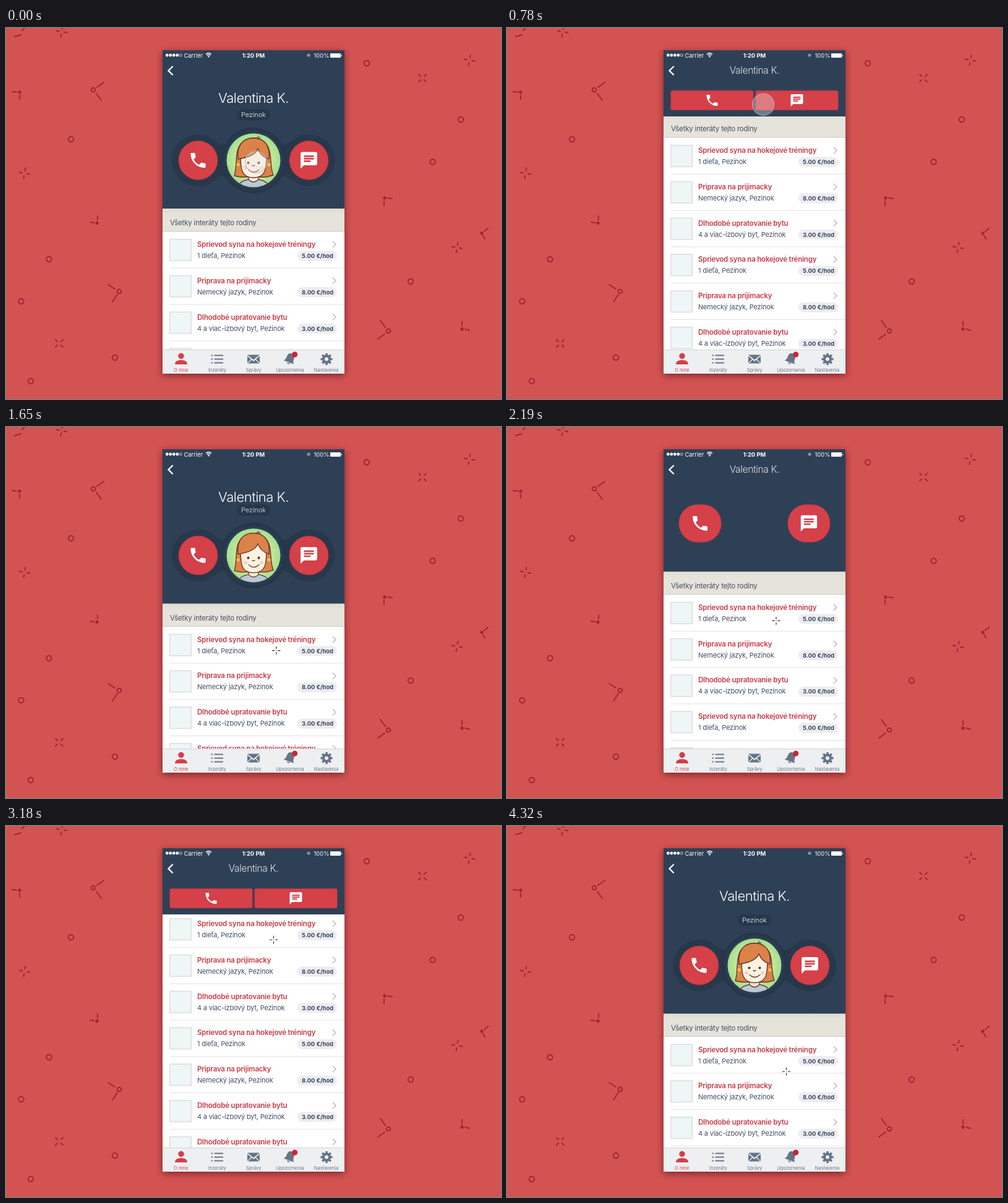
An HTML page that plays this animation: 800 by 600 pixels, repeating every 4350 ms.

```html
<!DOCTYPE html>
<html lang="sk">
<head>
<meta charset="utf-8">
<title>Collapsing profile header</title>
<style>
  html, body { margin: 0; width: 100%; height: 100%; overflow: hidden; background: #d25352; }
  svg { display: block; width: 100vw; height: 100vh; font-family: Inter, "Open Sans", sans-serif; }
  .deco { fill: none; stroke: #a12536; stroke-width: 1.9; stroke-linecap: round; }
  .deco .dot { fill: #a12536; }
  .mid { text-anchor: middle; }
  .status { font-size: 9.4px; fill: #fff; }
  .body { font-size: 11px; letter-spacing: -.2px; fill: #434f66; }
  .title { font-size: 11.5px; letter-spacing: -.2px; font-weight: 600; fill: #c73d49; }
  .price { font-size: 9.4px; font-weight: 700; fill: #3b475c; }
  .tab { font-size: 7.5px; fill: #6a7787; }
  .ink { stroke: #633429; stroke-width: 1.3; stroke-linejoin: round; stroke-linecap: round; }
</style>
</head>
<body>
<svg viewBox="0 0 800 600">
  <defs>
    <clipPath id="screen"><rect x="253" y="36" width="294" height="523"/></clipPath>
    <clipPath id="face"><circle r="43.3"/></clipPath>
    <radialGradient id="lawn"><stop offset=".35" stop-color="#e3f0a0"/><stop offset="1" stop-color="#a4df91"/></radialGradient>
    <linearGradient id="sand" x2="0" y2="1"><stop offset="0" stop-color="#dfdcd2"/><stop offset=".25" stop-color="#e6e4da"/><stop offset="1" stop-color="#e6e4da"/></linearGradient>
  </defs>
  <rect width="800" height="600" fill="#d25352"/>
  <g id="deco" class="deco"></g>
  <rect x="253" y="36" width="294" height="523" fill="#fff" style="filter:drop-shadow(0 3px 6px rgba(70,5,20,.6))"/>

  <g clip-path="url(#screen)">
    <g id="content">
      <rect x="253" width="294" height="37" fill="url(#sand)"/>
      <path d="M253 37h294" stroke="#cfcac5"/>
      <text class="body" x="265" y="27" style="font-size:11.5px">Všetky interáty tejto rodiny</text>
      <g id="rows"></g>
    </g>

    <rect id="header" x="253" y="36" width="294" fill="#2e4056"/>
    <g id="rings" fill="#28384b">
      <path d="M310 -42C335 -42 338 -25 353 -25L447 -25C462 -25 465 -42 490 -42A42 42 0 0 1 490 42C465 42 462 25 447 25L353 25C338 25 335 42 310 42A42 42 0 0 1 310 -42Z"/>
      <circle cx="400" r="52.5" stroke="#223145" stroke-width="1"/>
      <circle cx="400" r="47" fill="#2c3e53"/>
    </g>
    <g id="badge">
      <rect x="373" y="-9" width="54" height="18" rx="9" fill="#27374a"/>
      <text class="mid" x="400" y="4" font-size="10.8" letter-spacing="-.05" fill="#c4cbd3">Pezinok</text>
    </g>

    <g id="avatar">
      <circle r="43.5" fill="url(#lawn)"/>
      <g clip-path="url(#face)" class="ink">
        <path fill="#dc8249" d="M-31 25C-27 12 -29 -4 -26 -15C-20 -43 20 -43 26 -15C29 -4 27 12 32 24L21 27H-21Z"/>
        <path fill="#b9c9d7" d="M-25 46C-24 34 -14 32 -8 31H8C14 32 24 34 25 46Z"/>
        <path fill="#fbe6d2" d="M-8 22V31Q0 39 8 31V22Z"/>
        <path fill="#fdf1e2" d="M-21 -12C-21 14 -20 28 0 28S21 14 21 -12C12 -22 -12 -22 -21 -12Z"/>
        <path fill="#dc8249" d="M-25 -2C-12 -4 4 -8 7 -19C10 -10 16 -5 25 -2C27 -21 20 -36 0 -36S-27 -21 -25 -2Z"/>
        <path fill="none" d="M3 -36Q6 -35 8 -39M7 -35L11 -37M-2 8Q0 10 2 8M-8 15Q0 23 9 15"/>
        <circle cx="-8.500" cy="4" r="1.400" fill="#382522"/><circle cx="8.500" cy="4" r="1.400" fill="#382522"/>
        <g stroke="none">
          <circle cx="-13" cy="12" r="3" fill="#f8d3bd"/><circle cx="13" cy="12" r="3" fill="#f8d3bd"/>
          <circle cx="-25" cy="7" r="2.500" fill="#f4c83f"/><circle cx="25" cy="7" r="2.500" fill="#f4c83f"/>
        </g>
      </g>
    </g>

    <g id="name"><text class="mid" y="7.700" font-size="22" font-weight="300" letter-spacing="-.5" fill="#fff">Valentina K.</text></g>

    <g fill="#fff">
      <rect id="callBox" fill="#d54049" stroke="#b9333f" stroke-width=".7"/>
      <path id="callIcon" d="M6.620 10.790c1.440 2.830 3.760 5.140 6.590 6.590l2.200-2.200c.27-.27.67-.36 1.020-.24 1.120.37 2.330.57 3.570.57.55 0 1 .45 1 1V20c0 .55-.45 1-1 1C10.600 21 3 13.400 3 4c0-.55.45-1 1-1h3.500c.55 0 1 .45 1 1 0 1.250.2 2.450.57 3.570.11.35.03.74-.25 1.020z"/>
      <rect id="chatBox" fill="#d54049" stroke="#b9333f" stroke-width=".7"/>
      <path id="chatIcon" fill-rule="evenodd" d="M20 2H4Q2 2 2 4V22L6 18H20Q22 18 22 16V4Q22 2 20 2ZM6 6H18V8H6ZM6 9H18V11H6ZM6 12H14V14H6Z"/>
    </g>

    <g id="status"></g>
    <path d="M269 62.500L262.500 69L269 75.500" fill="none" stroke="#fff" stroke-width="2.400" stroke-linecap="round"/>

    <rect x="253" y="520" width="294" height="39" fill="#eeeff1"/>
    <path d="M253 520.500h294" stroke="#d2d3d8"/>
    <g id="tabs" fill="#657486">
      <g fill="#d33f49"><circle cx="283" cy="530.500" r="4.700"/><path d="M273 544Q273 537 283 537T293 544Z"/></g>
      <path d="M336.500 529.500H351M336.500 535.500H351M336.500 541.500H351M331.500 529.500h2.500M331.500 535.500h2.500M331.500 541.500h2.500" stroke="#657486" stroke-width="2"/>
      <path d="M390 528.500H410L400 536.500ZM390 530.500L396 535.500L390 542ZM410 530.500L404 535.500L410 542ZM397 536.500L400 539L403 536.500L409 542.500H391Z"/>
      <path transform="rotate(20 459 535)" d="M450 541Q453 539 453 533Q453 526 459 526T465 533Q465 539 468 541ZM456 542h6q-3 4-6 0Z"/>
      <circle cx="466.700" cy="528" r="4.500" fill="#d3222f"/>
      <g id="gear" fill="none" stroke="#657486"><circle cx="518" cy="535.500" r="5" stroke-width="4"/></g>
    </g>
  </g>

  <g id="touch"><circle r="17.500" fill="#e9e9e9" fill-opacity=".35" stroke="#b9b4b4" stroke-opacity=".65" stroke-width="1.500"/></g>
  <g id="cross" fill="none">
    <path d="M-7 0H-2.500M2.500 0H7M0 -7V-2.500M0 2.500V7" stroke="#fff" stroke-width="2.400" stroke-opacity=".7"/>
    <path d="M-6.500 0H-2.500M2.500 0H6.500M0 -6.500V-2.500M0 2.500V6.500M-.5 0H.5" stroke="#252525" stroke-width="1.100"/>
  </g>
</svg>
<script>
const LOOP = 4350;
const $ = id => document.getElementById(id);
const add = (id, markup) => $(id).insertAdjacentHTML('beforeend', markup);
const clamp = v => Math.max(0, Math.min(1, v));
const mix = (a, b, p) => a + (b - a) * p;
const move = (id, x, y, scale = 1) => $(id).setAttribute('transform', `translate(${x} ${y}) scale(${scale})`);
const set = (id, attrs) => { for (const key in attrs) $(id).setAttribute(key, attrs[key]); };

function drawBackdrop() {
  for (const [x, y] of [[105,180],[583,57],[735,148],[689.5,216.5],[69.5,374],[24.5,442],[176,533],[40,571],[654,410]])
    add('deco', `<circle cx="${x}" cy="${y}" r="4.2"/>`);
  for (const [x, y, turn] of [[90,6,10],[30,235,10],[749,52,10],[729,355,10],[673,81,45],[86,510,45]])
    add('deco', `<path transform="translate(${x} ${y}) rotate(${turn})" d="M-8.500 0H-4M4 0H8.500M0 -8.500V-4M0 4V8.500"/>`);
  const clocks = [
    [141, 100, 3.3, 'M147 96L158 88M146 106L154 117'], [183, 426, 3.3, 'M165 415L176 422M180 431L172 443'],
    [618, 490, 3.3, 'M605 473L613 484M612 495L601 503'], [769, 332, 1.7, 'M773 329L779 324M771 336L774 341'],
    [22, 104, 1.7, 'M10 103L17 103.500M22 109V115'], [147, 315.5, 1.7, 'M136 314L142 315M148 304V310'],
    [612, 275, 1.7, 'M617 275L624 276M611 280V287'], [737, 487, 1.7, 'M737 475V482M742 487L749 489']
  ];
  for (const [x, y, r, hands] of clocks)
    add('deco', `<circle cx="${x}" cy="${y}" r="${r}" class="${r < 2 ? 'dot' : ''}"/><path d="${hands}"/>`);
  add('deco', '<path d="M14 14L24 11M26 4L30 0"/>');
}

function drawRows() {
  const jobs = [
    ['Sprievod syna na hokejové tréningy', '1 dieťa, Pezinok', '5.00'],
    ['Priprava na prijimacky', 'Nemecký jazyk, Pezinok', '8.00'],
    ['Dlhodobé upratovanie bytu', '4 a viac-izbový byt, Pezinok', '3.00']
  ];
  [0, 1, 2, 0, 1, 2, 2, 0].forEach((job, i) => {
    const [title, info, price] = jobs[job];
    add('rows', `<g transform="translate(0 ${37 + i * 58.8})">
      <rect x="264.700" y="12.700" width="34.600" height="34.600" fill="#eef6f6" stroke="#dedddc" stroke-width="1.500"/>
      <text class="title" x="309" y="25">${title}</text>
      <text class="body" x="309" y="43">${info}</text>
      <rect x="471" y="31.500" width="64" height="16" rx="8" fill="#ececf1"/>
      <text class="price mid" x="503.500" y="43">${price} €/hod</text>
      <path d="M528 16L533 21L528 26" fill="none" stroke="#bfc0c4" stroke-width="1.600"/>
      <path d="M265 59.300H547" stroke="#e3e2e4"/></g>`);
  });
}

function drawBars() {
  for (let i = 0; i < 5; i++)
    add('status', `<circle cx="${260.3 + i * 5.5}" cy="44" r="${i < 4 ? 2.4 : 2}" fill="${i < 4 ? '#fff' : 'none'}" stroke="#fff" stroke-width="${i < 4 ? 0 : .7}"/>`);
  add('status', `<text class="status" x="287.500" y="47.500">Carrier</text>
    <path d="M323 42.500Q327.500 38.500 332 42.500M324.700 44.500Q327.500 42 330.300 44.500" fill="none" stroke="#fff" stroke-width="1.300"/>
    <circle cx="327.500" cy="46.300" r="1.200" fill="#fff"/>
    <text class="status mid" x="400" y="47.500" font-weight="700">1:20 PM</text>
    <circle cx="489" cy="44" r="2.600" fill="#8793a1"/>
    <text class="status" x="497.500" y="47.500">100%</text>
    <rect x="524" y="41" width="17" height="7" rx="1" fill="#fff"/><path d="M542.300 43v3" stroke="#fff"/>`);
  ['O mne', 'Inzeráty', 'Správy', 'Upozornenia', 'Nastavenia'].forEach((label, i) =>
    add('tabs', `<text class="tab mid" x="${282.7 + i * 58.7}" y="556" ${i ? '' : 'style="fill:#d33f49"'}>${label}</text>`));
  for (let i = 0; i < 8; i++)
    add('gear', `<path transform="rotate(${i * 45} 518 535.500)" d="M518 526V530" stroke-width="3.600"/>`);
}

// Monotone cubic through [time, value] keys; rests at turning points.
function track(keys) {
  const slope = i => (keys[i + 1][1] - keys[i][1]) / (keys[i + 1][0] - keys[i][0]);
  const tangent = keys.map((_, i) => {
    if (!i || i === keys.length - 1) return 0;
    const a = slope(i - 1), b = slope(i);
    return a * b > 0 ? 2 * a * b / (a + b) : 0;
  });
  return t => {
    let i = 0;
    while (i < keys.length - 2 && t >= keys[i + 1][0]) i++;
    const [t0, a] = keys[i], [t1, b] = keys[i + 1];
    const span = t1 - t0, u = clamp((t - t0) / span), v = 1 - u;
    return a * (1 + 2 * u) * v * v + b * u * u * (3 - 2 * u) + span * u * v * (tangent[i] * v - tangent[i + 1] * u);
  };
}
const headerEdge = track([[0,292],[450,148],[680,140],[850,140],[1140,160],[1700,288],[2190,234],[3130,99],[3180,100],[3780,238],[4320,303.5]]);
const pointerX = track([[0,404],[450,408],[1140,423],[1700,437],[2190,435],[3180,432.5],[3780,432.5],[4320,451.5]]);
const pointerY = track([[0,217],[450,110.5],[600,105],[1140,211.5],[1700,364],[2190,313.5],[3130,183],[3180,184],[3780,320.5],[4320,397]]);

function placeButton(box, icon, side, y, p) {
  const w = mix(63, 133.5, p), h = mix(63, 31.5, p);
  const x = 400 + side * mix(89.5, 68.5, p);
  set(box, { x: x - w / 2, y: y - h / 2, width: w, height: h, rx: mix(31.5, 2.5, p) });
  const scale = mix(1.34, 1, p);
  move(icon, x - 12 * scale, y - 12 * scale, scale);
}

function render(t) {
  const edge = headerEdge(t);
  const center = edge - 78;
  const squash = clamp((237 - edge) / 42);
  const open = clamp((edge - 238) / 44);
  const shown = clamp((edge - 236) / 46);

  move('content', 0, edge);
  set('header', { height: Math.max(143, edge) - 36 });
  move('rings', 0, center);
  set('rings', { opacity: clamp((edge - 245) / 40) });
  move('badge', 0, edge - 151.5);
  set('badge', { opacity: clamp((edge - 258) / 30) });
  move('avatar', 400, center, shown);
  set('avatar', { opacity: clamp(shown * 2) });
  move('name', 400, mix(69, 113, open), mix(.707, 1, open));
  set('name', { opacity: mix(.85, 1, open) });
  placeButton('callBox', 'callIcon', -1, Math.max(117, center), squash);
  placeButton('chatBox', 'chatIcon', 1, Math.max(117, center), squash);

  const pressed = t < 1650;
  set('touch', { opacity: pressed ? 1 : 0 });
  set('cross', { opacity: pressed ? 0 : 1 });
  for (const id of ['touch', 'cross']) move(id, pointerX(t), pointerY(t));
}

drawBackdrop();
drawRows();
drawBars();
const start = performance.now();
function tick() {
  render((performance.now() - start) % LOOP);
  requestAnimationFrame(tick);
}
tick();
</script>
</body>
</html>
```
